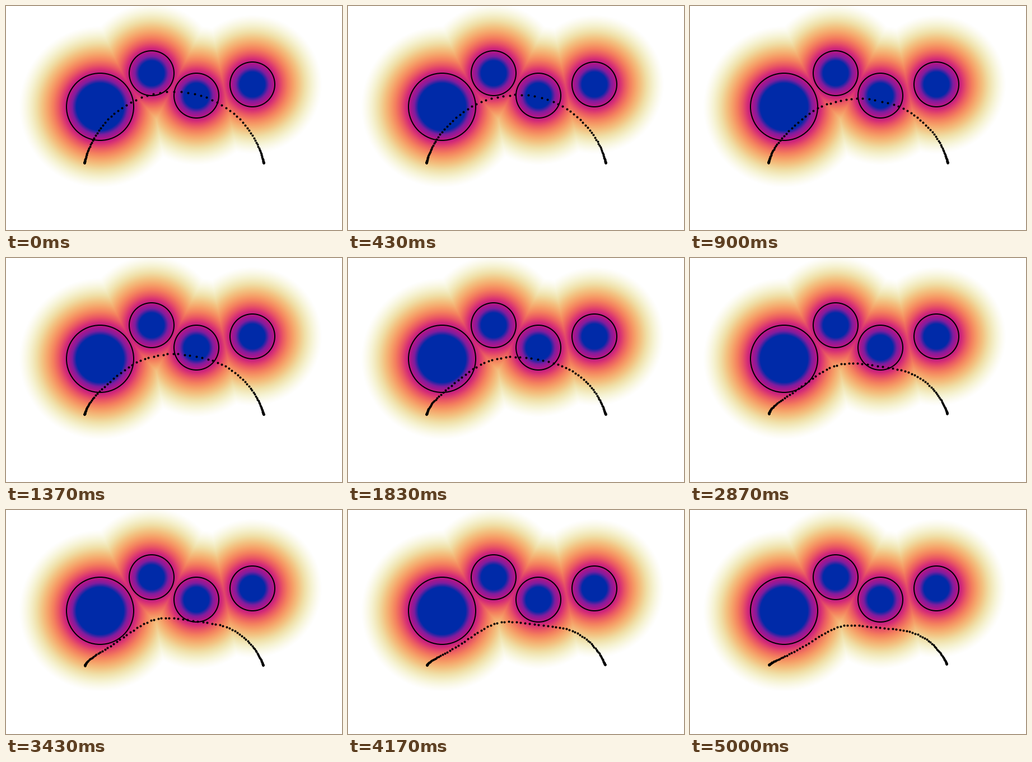
These frames come from a looping animation (600x400 px, 5.03 s). A matplotlib script:

```python
import numpy as np
import matplotlib.pyplot as plt
from matplotlib.animation import FuncAnimation
from matplotlib.colors import LinearSegmentedColormap
from matplotlib.patches import Circle

W, H, DPI = 600, 400, 100
FRAMES, LOOP = 151, 5030
PX = 72 / DPI

OBSTACLES = np.array([(168, 180, 60), (260, 120, 40), (340, 160, 40), (440, 140, 40)])
NEAR, FAR = -18, 85   # clearances where the colour scale saturates
FALLOFF = 1.35

RAMP = [(255, 255, 255), (246, 243, 211), (240, 224, 168), (243, 194, 129),
        (246, 162, 105), (244, 127, 94), (234, 88, 99), (214, 46, 118),
        (179, 22, 138), (128, 28, 158), (0, 42, 168)]

HALF = 50             # dots on each side of the middle one
STIFFNESS = 0.5
PUSH, REACH = 0.3, 40  # obstacle force and the clearance where it ends


def clearance(x, y):
    """Signed distance from each obstacle, one row per obstacle."""
    return np.array([np.hypot(x - cx, y - cy) - r for cx, cy, r in OBSTACLES])


def start_path():
    """Circular arc travelled with a cubic ease in and out."""
    width, rise = 160, 127.3
    radius = (width**2 + rise**2) / (2 * rise)
    u = np.linspace(-1, 1, 2 * HALF + 1)
    angle = np.arcsin(width / radius) * np.sign(u) * (1 - (1 - np.abs(u)) ** 3)
    return np.column_stack([300 + radius * np.sin(angle),
                            280 - rise + radius * (1 - np.cos(angle))])


def repulsion(p):
    """Push away from the nearest obstacle, fading out with clearance."""
    d = clearance(*p.T)
    nearest = d.argmin(axis=0)
    away = p - OBSTACLES[nearest, :2]
    away /= np.maximum(np.hypot(*away.T), 1e-6)[:, None]
    return PUSH * np.clip(1 - d.min(axis=0) / REACH, 0, 1)[:, None] * away


def smoothing(p):
    """Second derivative over every other dot, with free ends."""
    q = np.pad(p, ((2, 2), (0, 0)), mode="reflect")
    return STIFFNESS * (q[4:] - 2 * p + q[:-4]) / 4


def relax(p, steps):
    path = [p]
    for _ in range(steps - 1):
        p = p + smoothing(p) + repulsion(p)
        path.append(p)
    return path


fig = plt.figure(figsize=(W / DPI, H / DPI), dpi=DPI, facecolor="white")
ax = fig.add_axes([0, 0, 1, 1])
ax.axis("off")

gx, gy = np.meshgrid(np.arange(W) + 0.5, np.arange(H) + 0.5)
dist = clearance(gx, gy).min(axis=0)
heat = np.clip((FAR - dist) / (FAR - NEAR), 0, 1) ** FALLOFF
cmap = LinearSegmentedColormap.from_list("heat", np.array(RAMP) / 255, N=512)
ax.imshow(heat, cmap=cmap, vmin=0, vmax=1, extent=(0, W, H, 0),
          interpolation="nearest", aspect="auto")
for x, y, r in OBSTACLES:
    ax.add_patch(Circle((x, y), r, fill=False, ec="black", lw=2 * PX))
ax.set(xlim=(0, W), ylim=(H, 0))

chain, = ax.plot([], [], "o", color="black", ms=4 * PX, mew=0, zorder=5)
poses = relax(start_path(), FRAMES)


def update(n):
    chain.set_data(*poses[n].T)
    return chain,


anim = FuncAnimation(fig, update, frames=FRAMES, interval=LOOP / FRAMES,
                     blit=True, repeat=True, repeat_delay=0)
plt.show()
```
